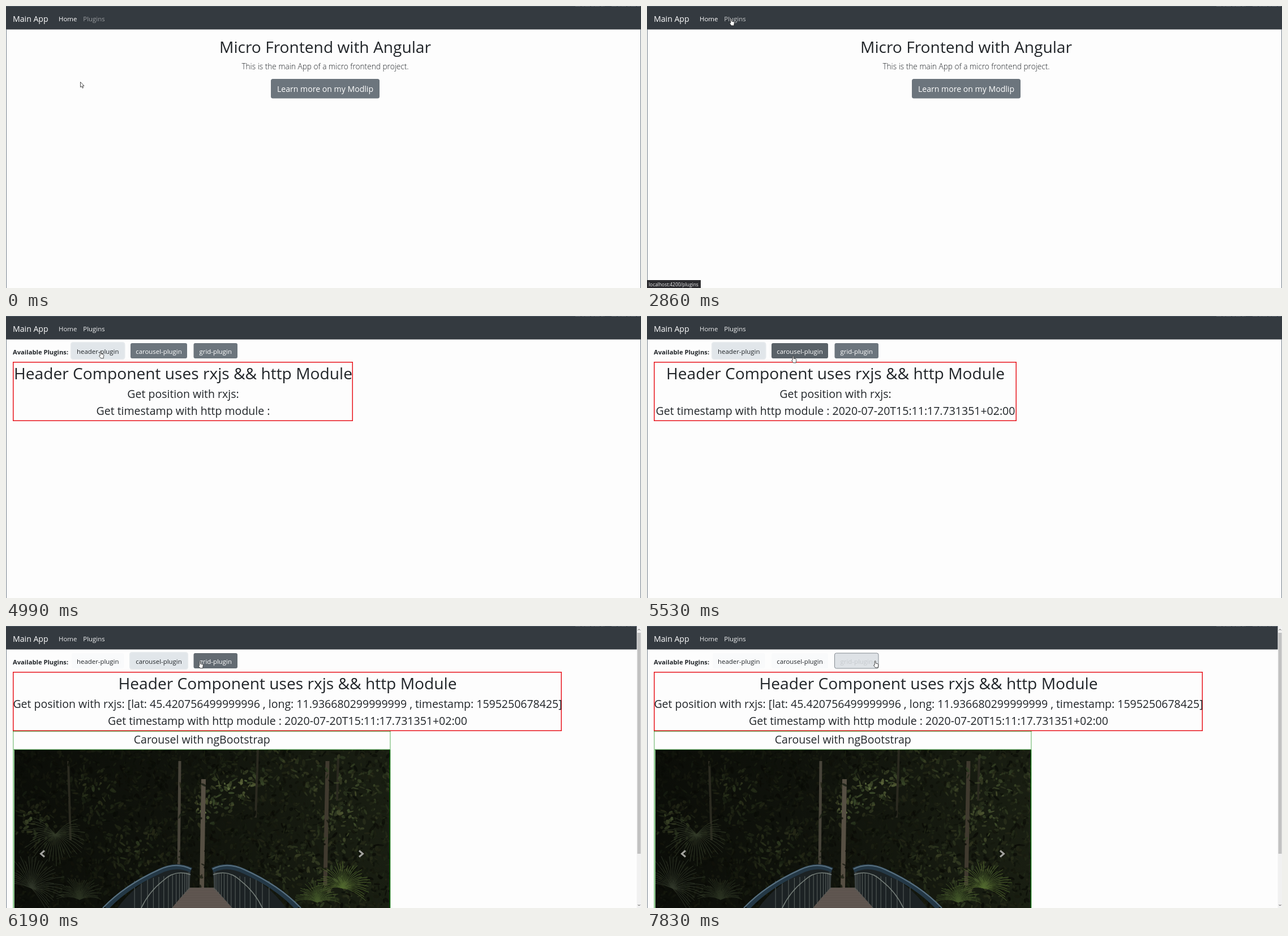
Animation, 1122 px wide and 499 px high, one loop 8000 ms. Source, as an HTML page with a canvas:

```html
<!DOCTYPE html>
<html lang="en">
<head>
<meta charset="utf-8">
<title>Micro Frontend with Angular</title>
<style>
html, body { margin: 0; width: 100%; height: 100%; overflow: hidden; background: #fdfdfd; }
canvas, svg { position: absolute; left: 0; top: 0; }
canvas { left: 15px; top: 219px; }
text { font: 11.4px "Open Sans", "Noto Sans", sans-serif; fill: #212529; white-space: pre; }
.mid { text-anchor: middle; }
.brand, .large { font-size: 14.1px; fill: #fff; }
.h1 { font-size: 28.15px; }
.h3 { font-size: 19.5px; }
.lead { font-size: 13.7px; font-weight: 300; }
.bold { font-size: 11.2px; font-weight: 700; }
.status { font-size: 8.4px; fill: #e8e8e8; }
.dots { fill: none; stroke: #008000; stroke-width: 1.3; stroke-dasharray: 1 1; }
</style>
</head>
<body>
<canvas id="photo" width="664" height="280"></canvas>
<svg width="1122" height="499" viewBox="0 0 1122 499">
  <rect width="1122" height="41.5" fill="#343a40"/>
  <path d="M0 .5H1122" stroke="#4b5762"/>
  <path d="M1006 .3H1058M1070 .3H1120" stroke="#8b939a" stroke-width=".6" stroke-dasharray="9 2 5 1"/>
  <path d="M.5 41V499M1121.5 41V499" stroke="#75808b"/>
  <text class="brand" x="12" y="28">Main App</text>
  <text id="home" x="93" y="26.8" fill="#fff">Home</text>
  <text id="plugins" x="136.3" y="26.8">Plugins</text>

  <g id="homePage">
    <text class="h1 mid" x="564" y="83.3">Micro Frontend with Angular</text>
    <text class="lead mid" x="564" y="111.8">This is the main App of a micro frontend project.</text>
    <rect x="468" y="129" width="192" height="34.5" rx="3.5" fill="#6c757d"/>
    <text class="large mid" x="564" y="152.3">Learn more on my Modlip</text>
  </g>

  <g id="pluginPage">
    <text class="bold" x="12" y="67.5">Available Plugins:</text>
    <g id="buttons"></g>
    <g id="header">
      <rect id="redBox" x="12.75" y="81.75" height="103.5" fill="none" stroke="#e8141c" stroke-width="1.5"/>
      <g id="headerText">
        <text class="h1 mid" y="112.3">Header Component uses rxjs &amp;&amp; http Module</text>
        <text class="h3 mid" y="144.8" id="position"></text>
        <text class="h3 mid" y="175.3" id="stamp"></text>
      </g>
    </g>
    <g id="carousel">
      <rect id="outer" class="dots" x="12.8" y="186.5"/>
      <rect id="inner" class="dots" x="14.2" y="218.5"/>
      <text id="carouselTitle" class="h3 mid" y="208">Carousel with ngBootstrap</text>
    </g>
    <g id="loaded">
      <path d="M68 397.5L61.5 403L68 408.5M624 397.5L630.5 403L624 408.5" fill="none" stroke="#a3a39f" stroke-width="3"/>
      <rect x="1114.5" width="8" height="499" fill="#f1f1f1"/>
      <rect x="1115.5" y="12" width="6" height="391" fill="#c1c1c1"/>
      <path d="M1116.5 7.5L1118.5 5.5L1120.5 7.5M1116.5 493L1118.5 495L1120.5 493" fill="none" stroke="#505050"/>
    </g>
  </g>

  <g id="status">
    <rect y="485" width="95" height="14" fill="#2b2b2e"/>
    <text class="status" x="3" y="496">localhost:4200/plugins</text>
  </g>
  <path id="cursor" fill="#fff" stroke="#222" stroke-width=".8" stroke-linejoin="round"/>
</svg>
<script>
const $ = id => document.getElementById(id);
const LOOP = 8000;
const ARROW = 'M.5 .5V9.7L2.6 7.8L4.1 11.3L5.6 10.6L4.2 7.3H7Z';
const HAND = 'M2.2 8.2V1.3Q3.1 .1 4.1 1.3V5L8 6Q9 6.4 8.9 7.6L8.3 10.8V12.8H3.7L.5 8.8Q.9 7.3 2.2 8.2Z';

// Steps: [start time, ...values]; the last one begun applies.
const at = (steps, t) => steps.findLast(s => s[0] <= t);

const cursorSteps = [
  [0, 131, 134], [850, 135, 94], [990, 138, 75], [1140, 137, 52], [1260, 132, 30],
  [1380, 143, 19], [1530, 144, 20], [1650, 145, 21], [1770, 145.5, 22],
  [3430, 146, 25], [3550, 147, 30], [3710, 149, 37], [3850, 151, 48], [3970, 152, 57], [4090, 152, 61],
  [4990, 164, 62], [5130, 200, 68], [5280, 225, 74], [5400, 245, 75], [5530, 255, 70],
  [5820, 261, 67.5], [6190, 339.5, 62], [6340, 350, 62], [6460, 362, 62], [6580, 374, 62],
  [6700, 383, 61.5], [6850, 390, 61], [6975, 396, 61], [7100, 400, 61]
];
const statusSteps = [[0, 0], [1650, .4], [1770, .8], [1920, 1], [3000, .6], [3150, 0]];

// Look of a button: background, text, border, focus ring
const looks = {
  normal: ['#6c757d', '#fff', 'none', 'none'],
  enter: ['#636b72', '#fff', 'none', 'none'],
  hover: ['#5a6268', '#fff', 'none', 'none'],
  press: ['#545b62', '#fff', 'none', '#d3d6d9'],
  fade: ['#dee2e6', '#c6cace', '#858c93', 'none'],
  active: ['#e1e6ea', '#212529', 'none', '#e5e9ec'],
  light: ['#f9fafb', '#212529', 'none', 'none']
};

function addButton(label, x, width, steps) {
  const g = document.createElementNS('http://www.w3.org/2000/svg', 'g');
  g.innerHTML = `<rect x="${x - 2}" y="46" width="${width + 4}" height="31" rx="4.5"/>
    <rect x="${x}" y="48" width="${width}" height="27" rx="3"/>
    <text class="mid" x="${x + width / 2}" y="66.6">${label}</text>`;
  $('buttons').append(g);
  const [ring, body, text] = g.children;
  return t => {
    const [fill, ink, border, glow] = looks[at(steps, t)[1]];
    ring.style.fill = glow;
    body.style.fill = fill;
    body.style.stroke = border;
    text.style.fill = ink;
  };
}

const buttons = [
  addButton('header-plugin', 116, 92.5, [[0, 'normal'], [3850, 'enter'], [3970, 'hover'],
    [4570, 'press'], [4710, 'fade'], [4830, 'active'], [5670, 'light']]),
  addButton('carousel-plugin', 220, 100, [[0, 'normal'], [5280, 'enter'], [5400, 'hover'],
    [5670, 'press'], [5820, 'fade'], [6070, 'active'], [7680, 'light']]),
  addButton('grid-plugin', 331.5, 77.5, [[0, 'normal'], [6190, 'enter'], [6340, 'hover'],
    [7680, 'press'], [7830, 'fade']])
];

function paintForest() {
  const c = $('photo').getContext('2d');
  let seed = 7;
  const rnd = () => (seed = seed * 16807 % 2147483647) / 2147483647;
  const shape = (d, fill, stroke, width = 1) => {
    const p = new Path2D(d);
    if (fill) { c.fillStyle = fill; c.fill(p); }
    if (stroke) { c.strokeStyle = stroke; c.lineWidth = width; c.stroke(p); }
  };
  const shade = c.createLinearGradient(0, 0, 664, 0);
  shade.addColorStop(0, '#0b0d08');
  shade.addColorStop(.45, '#10130c');
  shade.addColorStop(1, '#191e12');
  c.fillStyle = shade;
  c.fillRect(0, 0, 664, 280);

  // Light patches: x, y, radius, strength
  const patches = [[375, 72, 30, 32], [330, 110, 24, 32], [415, 65, 22, 24], [30, 130, 32, 22],
    [560, 55, 60, 12], [590, 135, 50, 16], [490, 205, 45, 12], [140, 75, 45, 10],
    [210, 175, 50, 11], [470, 25, 50, 8], [640, 60, 40, 10], [560, 245, 45, 14]];
  const leaves = n => {
    for (let i = 0; i < n; i++) {
      const x = rnd() * 664, y = rnd() * 280;
      const glow = patches.reduce((sum, [px, py, r, k]) =>
        sum + k * Math.exp(-((x - px) ** 2 + (y - py) ** 2) / (r * r)), 0);
      const light = 3 + rnd() * (5 + x / 140 + glow);
      c.fillStyle = `hsla(${70 + rnd() * 20}, 27%, ${light}%, .75)`;
      c.beginPath();
      c.ellipse(x, y, 1.5 + rnd() * 5, 1 + rnd() * 2, rnd() * Math.PI, 0, 7);
      c.fill();
    }
  };
  leaves(3200);
  shape('M292 20L290 215', 0, '#48443a', 5);
  shape('M334 52L331 245', 0, '#564f43', 8);
  shape('M553 20L549 240', 0, '#403a2f', 7);
  shape('M572 10L570 90M430 0L426 120M95 20L99 160', 0, '#2b2a20', 4);
  leaves(700);

  const fan = (x, y, r, from, to, color) => {
    for (let i = 0; i < 34; i++) {
      const a = from + (to - from) * i / 33, d = r * (.65 + .35 * rnd());
      const ex = x + d * Math.cos(a), ey = y + d * Math.sin(a);
      shape(`M${x} ${y}Q${(x + ex) / 2} ${(y + ey) / 2 - 9} ${ex} ${ey}`, 0, color, .9);
    }
  };
  fan(72, 150, 58, -.6, 3.8, '#333a29');
  fan(30, 245, 62, -3, 1, '#30372a');
  fan(115, 265, 45, -3.1, 0, '#2b3322');
  fan(580, 245, 52, -3.3, .5, '#52692f');
  fan(535, 270, 42, -3.1, 0, '#43572a');

  // Footbridge
  shape('M278 280L308 244H355L387 280Z', '#665c56');
  for (let y = 246; y < 280; y += 3) shape(`M${308 - (y - 244) * .83} ${y}H${355 + (y - 244) * .88}`, 0, '#4a423e', .8);
  const side = (edge, dir) => {
    const X = d => edge + dir * d;
    shape(`M${X(0)} 215Q${X(24)} 205 ${X(50)} 216Q${X(100)} 238 ${X(130)} 280H${X(35)}L${X(3)} 244Z`, '#1c2224');
    for (let i = 0; i < 15; i++) {
      const d = 3 + i * i * .38 + i * 1.6;
      shape(`M${X(d)} ${216 + d * .16}V${Math.min(280, 244 + d * 1.1)}`, 0, '#545b59', 1.1);
    }
    shape(`M${X(1)} 221Q${X(28)} 211 ${X(50)} 232Q${X(75)} 252 ${X(88)} 280`, 0, '#77807b', 1.6);
    shape(`M${X(0)} 213Q${X(26)} 200 ${X(56)} 215Q${X(115)} 242 ${X(150)} 280`, 0, '#243846', 9);
    shape(`M${X(0)} 211Q${X(26)} 198 ${X(56)} 212Q${X(118)} 240 ${X(156)} 280`, 0, '#587080', 2);
  };
  side(312, -1);
  side(350, 1);
}

const show = (id, on) => $(id).style.display = on ? '' : 'none';

function setWidths(header, carousel) {
  $('redBox').setAttribute('width', header - 13.5);
  for (const line of $('headerText').children) line.setAttribute('x', (header + 13) / 2);
  const tall = carousel > 300;
  $('outer').setAttribute('width', carousel - 13.4);
  $('outer').setAttribute('height', tall ? 400 : 52);
  $('inner').setAttribute('width', carousel - 15.6);
  $('inner').setAttribute('height', tall ? 400 : 18.8);
  $('carouselTitle').setAttribute('x', (carousel + 13) / 2);
}

function draw(t) {
  const onPlugins = t >= 3000, located = t >= 6070, loaded = t >= 6190;
  show('homePage', !onPlugins);
  show('pluginPage', onPlugins);
  show('header', t >= 4710);
  show('carousel', t >= 5820);
  show('loaded', loaded);
  show('photo', loaded);
  $('home').style.fill = onPlugins ? '#e9eaeb' : '#fff';
  $('plugins').style.fill = onPlugins ? '#f3f4f4' : t >= 1380 ? '#cccecf' : '#999c9f';

  setWidths(located ? 982 : t >= 5130 ? 653 : 613, loaded ? 679.5 : 255.5);
  $('position').textContent = 'Get position with rxjs:' +
    (located ? ' [lat: 45.420756499999996 , long: 11.936680299999999 , timestamp: 1595250678425]' : '');
  $('stamp').textContent = 'Get timestamp with http module :' +
    (t >= 5130 ? ' 2020-07-20T15:11:17.731351+02:00' : '');
  buttons.forEach(update => update(t));

  $('status').style.opacity = at(statusSteps, t)[1];
  const [, x, y] = at(cursorSteps, t);
  $('cursor').setAttribute('d', t < 1380 ? ARROW : HAND);
  $('cursor').setAttribute('transform', `translate(${x} ${y})`);
}

paintForest();
const start = performance.now();
function tick() {
  draw((performance.now() - start) % LOOP);
  requestAnimationFrame(tick);
}
tick();
</script>
</body>
</html>
```
